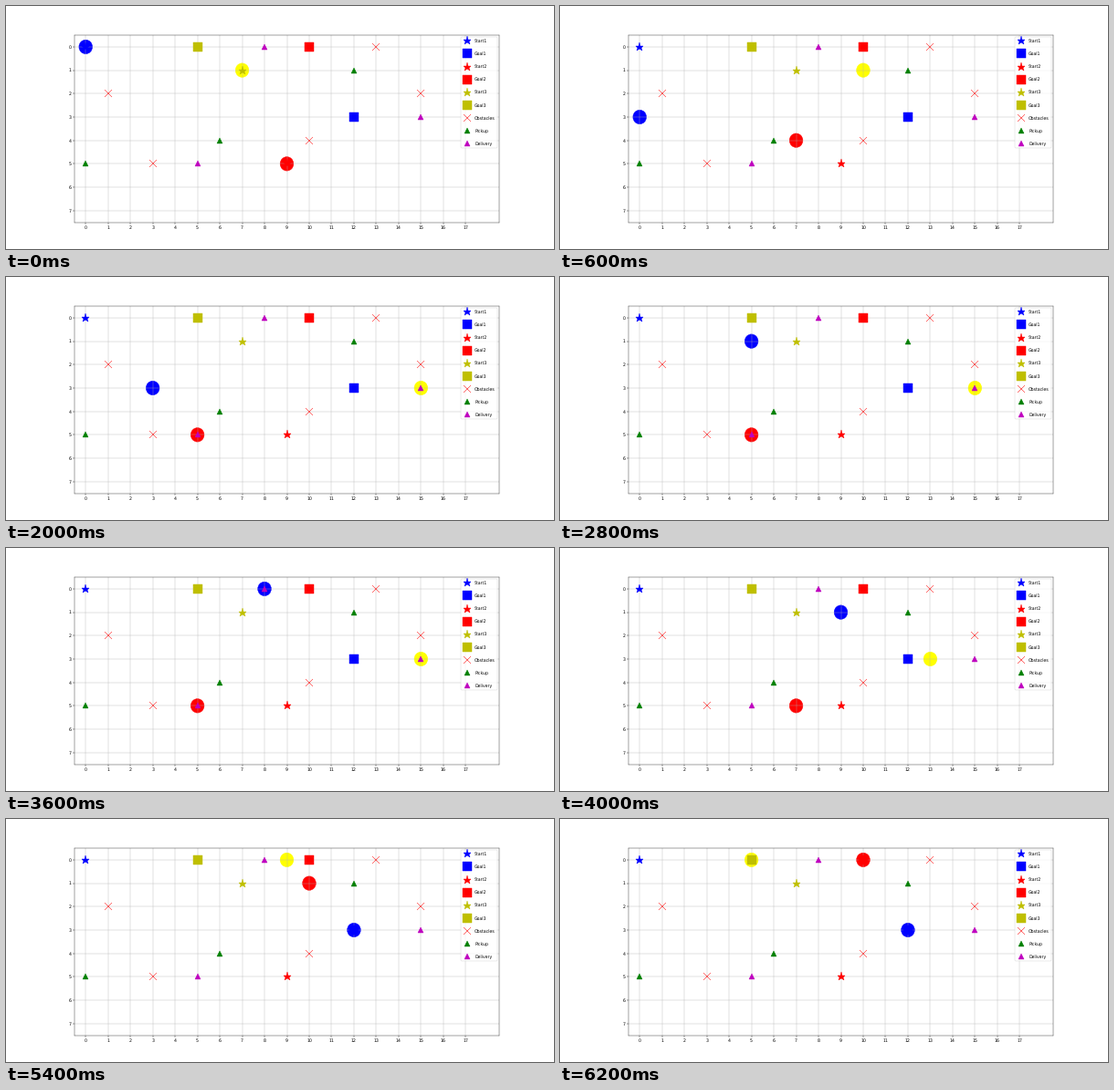
A matplotlib script for the animation above (6.4 s loop, 600 by 267 pixels).

```python
import matplotlib.pyplot as plt
from matplotlib.animation import FuncAnimation
from matplotlib.patches import Circle

plt.rcParams["font.family"] = "DejaVu Sans"
plt.rcParams["text.hinting"] = "none"

STEPS = 32
STEP_MS = 200
MOVES = {"L": (-1, 0), "R": (1, 0), "U": (0, -1), "D": (0, 1), ".": (0, 0)}

# Each route has three legs: to pickup, to delivery, to goal.
# Robots that finish a leg early wait for the slowest one.
LEG_STEPS = (5, 13, 13)
ROBOTS = [
    ("blue", (0, 0), ("DDDDD", "RURURRURURRUR", "RDRDRRD")),
    ("red", (9, 5), ("LLUL", "LD", "RRURRUURUU")),
    ("yellow", (7, 1), ("RRRRR", "DRDRR", "LLULULLULLLLL")),
]

MARKERS = [
    ("Start1", "b*", 20, [(0, 0)]),
    ("Goal1", "bs", 20, [(12, 3)]),
    ("Start2", "r*", 20, [(9, 5)]),
    ("Goal2", "rs", 20, [(10, 0)]),
    ("Start3", "y*", 20, [(7, 1)]),
    ("Goal3", "ys", 20, [(5, 0)]),
    ("Obstacles", "rx", 16, [(1, 2), (3, 5), (10, 4), (13, 0), (15, 2)]),
    ("Pickup", "g^", 15, [(0, 5), (6, 4), (12, 1)]),
    ("Delivery", "m^", 15, [(5, 5), (8, 0), (15, 3)]),
]


def trace(start, legs):
    """Return the cell occupied at every step."""
    cells = [start]
    for leg, steps in zip(legs, LEG_STEPS):
        for move in leg.ljust(steps, "."):
            dx, dy = MOVES[move]
            x, y = cells[-1]
            cells.append((x + dx, y + dy))
    return cells


fig, ax = plt.subplots(figsize=(18, 8.01), dpi=100 / 3)
fig.subplots_adjust(left=0.125, right=0.9, bottom=0.11, top=0.88)
ax.set_xlim(-0.5, 18.5)
ax.set_ylim(7.5, -0.5)
ax.set_xticks(range(18))
ax.set_yticks(range(8))
ax.grid(True)

for label, style, size, cells in MARKERS:
    xs, ys = zip(*cells)
    ax.plot(xs, ys, style, markersize=size, linestyle="none", label=label)
ax.legend(loc="upper right", labelspacing=2)

robots = []
for color, start, legs in ROBOTS:
    disc = ax.add_patch(Circle(start, 0.3, color=color))
    robots.append((disc, trace(start, legs)))


def update(step):
    for disc, path in robots:
        disc.center = path[step]
    return [disc for disc, _ in robots]


anim = FuncAnimation(fig, update, frames=STEPS, interval=STEP_MS,
                     repeat=True, repeat_delay=0)
plt.show()
```
